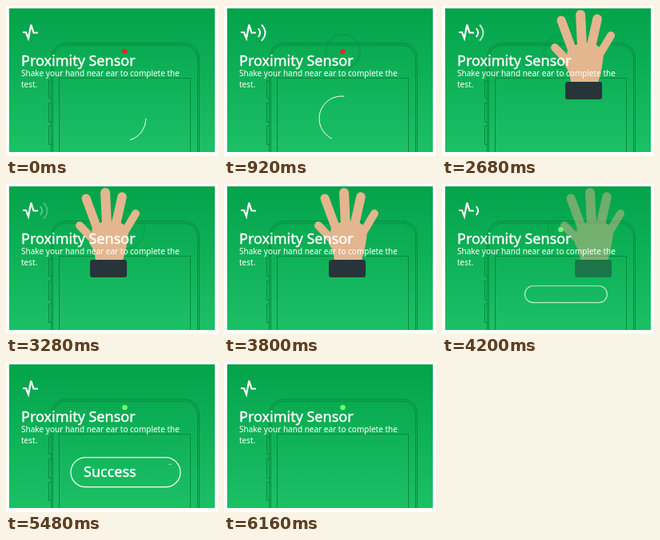
Animation, 265 px wide and 188 px high, one loop 6240 ms. Source, as an HTML page:

```html
<!DOCTYPE html>
<html lang="en">
<head>
<meta charset="utf-8">
<title>Proximity Sensor</title>
<style>
  html, body { margin: 0; width: 100%; height: 100%; overflow: hidden; background: #fff; }
  svg { display: block; width: 265px; height: 188px; }
  text { font-family: "Noto Sans", "Open Sans", sans-serif; fill: #fff; }
  .title { font-size: 18px; stroke: #fff; stroke-width: .4; }
  .body { font-size: 10px; }
  .line { fill: none; stroke: #fff; }
  .phone { fill: none; stroke: #078a40; stroke-width: 1; }
  .fingers { fill: none; stroke: #e3b68f; stroke-linecap: round; }
</style>
</head>
<body>
<svg viewBox="0 0 265 188">
  <defs>
    <linearGradient id="green" x1="0" y1="0" x2="0" y2="1">
      <stop offset="0" stop-color="#03a34a"/>
      <stop offset="1" stop-color="#1cc065"/>
    </linearGradient>
    <clipPath id="card"><rect x="4" y="3" width="257" height="180"/></clipPath>
  </defs>
  <g clip-path="url(#card)">
    <rect x="4" y="3" width="257" height="180" fill="url(#green)"/>
    <g class="phone">
      <rect x="56.5" y="46.5" width="185" height="200" rx="19"/>
      <rect x="58.5" y="49" width="181" height="200" rx="17"/>
      <rect x="66.5" y="90.5" width="164" height="150"/>
      <path d="M56 93.5h-2.5v22H56M56 121.5h-2.5v24H56M56 150.5h-2.5v23H56"/>
      <circle id="ringA" cx="148.5" cy="57"/>
      <circle id="ringB" cx="148.5" cy="57"/>
    </g>
    <circle id="dot" cx="148.5" cy="57" r="3.3"/>
    <path id="spinner" class="line"/>

    <g id="hand">
      <path d="M-20 54Q-8 46 3 46Q18 46 25 58Q24 76 18 96H-16Q-17 84 -23 75Z" fill="#e3b68f"/>
      <g class="fingers">
        <path d="M-17 72L-36 52" stroke-width="10"/>
        <path d="M-14 56L-28 18" stroke-width="11"/>
        <path d="M-2 52L-4 11" stroke-width="12"/>
        <path d="M9 52L17 16" stroke-width="11.5"/>
        <path d="M19 62L34 37" stroke-width="10"/>
      </g>
      <rect x="-23" y="95" width="46" height="22" rx="3" fill="#27343a"/>
    </g>

    <g id="result">
      <rect id="pill" class="line" stroke-width="1.2"/>
      <text id="label" class="title" x="97" y="144">Success</text>
      <path id="knob" class="line" stroke-opacity=".6"/>
    </g>

    <path class="line" stroke-width="2.2" d="M21 33H25L28 40.5L31.3 23.5L34.5 33.5H40"/>
    <path id="near" class="line" stroke-width="1.9" d="M42.7 28Q47.5 33.5 42.7 39"/>
    <path id="far" class="line" stroke-width="1.9" d="M47 23.5Q56 33.5 47 43.5"/>
    <text class="title" x="19" y="75">Proximity Sensor</text>
    <text class="body" x="19" y="88">Shake your hand near ear to complete the</text>
    <text class="body" x="19" y="102">test.</text>
  </g>
</svg>
<script>
const LOOP = 6240, STEP = 40, PULSE = 5600 / 3;
const $ = id => document.getElementById(id);
const set = (id, attrs) => {
  for (const name in attrs) $(id).setAttribute(name, attrs[name]);
};

const ramp = (t, from, to) => Math.min(1, Math.max(0, (t - from) / (to - from)));
const mix = (a, b, p) => a + (b - a) * p;
const smooth = p => (1 - Math.cos(Math.PI * p)) / 2;
const smoother = p => p * p * p * (p * (p * 6 - 15) + 10);
const easeOut = (p, power) => 1 - (1 - p) ** power;

// Circular arc between two angles in degrees, clockwise from the right.
function arc(cx, cy, r, from, to) {
  const sweep = Math.min(to - from, 359.9);
  if (sweep < 0.5) return "";
  const point = deg => {
    const a = deg * Math.PI / 180;
    return `${cx + r * Math.cos(a)} ${cy + r * Math.sin(a)}`;
  };
  return `M${point(from)}A${r} ${r} 0 ${sweep > 180 ? 1 : 0} 1 ${point(from + sweep)}`;
}

function drawWaves(t) {
  const p = t < 5600 ? t % PULSE : 0;
  set("near", { opacity: ramp(p, 180, 440) * (1 - ramp(p, 1160, 1540)) });
  set("far", { opacity: ramp(p, 560, 900) * (1 - ramp(p, 1160, 1510)) });
}

function drawRing(id, t, lag) {
  const p = ramp(t % PULSE, lag, PULSE);
  set(id, {
    r: mix(4, 25, easeOut(p, 3)),
    opacity: 0.6 * ramp(p, 0, 0.1) * (1 - 0.7 * p) * (1 - ramp(t, 4280, 4600))
  });
}

function drawSpinner(t) {
  const lead = 61, end = 1960;
  const p = t < end ? (t + lead) / (end + lead) * 3 % 1 : 1;
  const head = 360 * easeOut(p, 2.4);
  const tail = 360 * smoother(ramp(p, 0.09, 1));
  set("spinner", { d: t < end ? arc(147, 141, 28, tail, head) : "" });
}

function drawHand(t) {
  const away = smooth(ramp(t, 2400, 3300)) - smooth(ramp(t, 3400, 4300));
  set("hand", {
    transform: `translate(${mix(191, 128, away)} 0)`,
    opacity: ramp(t, 1960, 2240) * (1 - ramp(t, 4040, 4350))
  });
}

function drawSensor(t) {
  const p = ramp(t, 4000, 4160);
  const red = [229, 39, 47], lime = [116, 244, 112];
  set("dot", { fill: `rgb(${red.map((c, i) => Math.round(mix(c, lime[i], p)))})` });
  drawRing("ringA", t, 0);
  drawRing("ringB", t, 250);
}

function drawResult(t) {
  const grow = easeOut(ramp(t, 3960, 4480), 1.34);
  const width = mix(58, 149, easeOut(ramp(t, 3960, 4480), 1.1)) - 12 * smooth(ramp(t, 4480, 4760));
  const height = 37 * grow;
  set("pill", {
    x: mix(162, 149.5, grow) - width / 2, y: 138.2 - height / 2,
    width, height, rx: height / 2
  });
  set("result", { opacity: ramp(t, 3920, 4320) * (1 - ramp(t, 6000, 6160)) });
  set("label", { opacity: ramp(t, 4440, 4680) });
  const head = 360 * smooth(ramp(t, 4480, 4840));
  const tail = 360 * easeOut(ramp(t, 4900, 5600), 1.6);
  set("knob", { d: arc(207, 138, 10, tail - 90, head - 90) });
}

function draw(now) {
  const t = Math.floor(now % LOOP / STEP) * STEP;
  drawWaves(t);
  drawSpinner(t);
  drawHand(t);
  drawSensor(t);
  drawResult(t);
}

let start;
function tick(now) {
  start ??= now;
  draw(now - start);
  requestAnimationFrame(tick);
}
draw(0);
requestAnimationFrame(tick);
</script>
</body>
</html>
```
